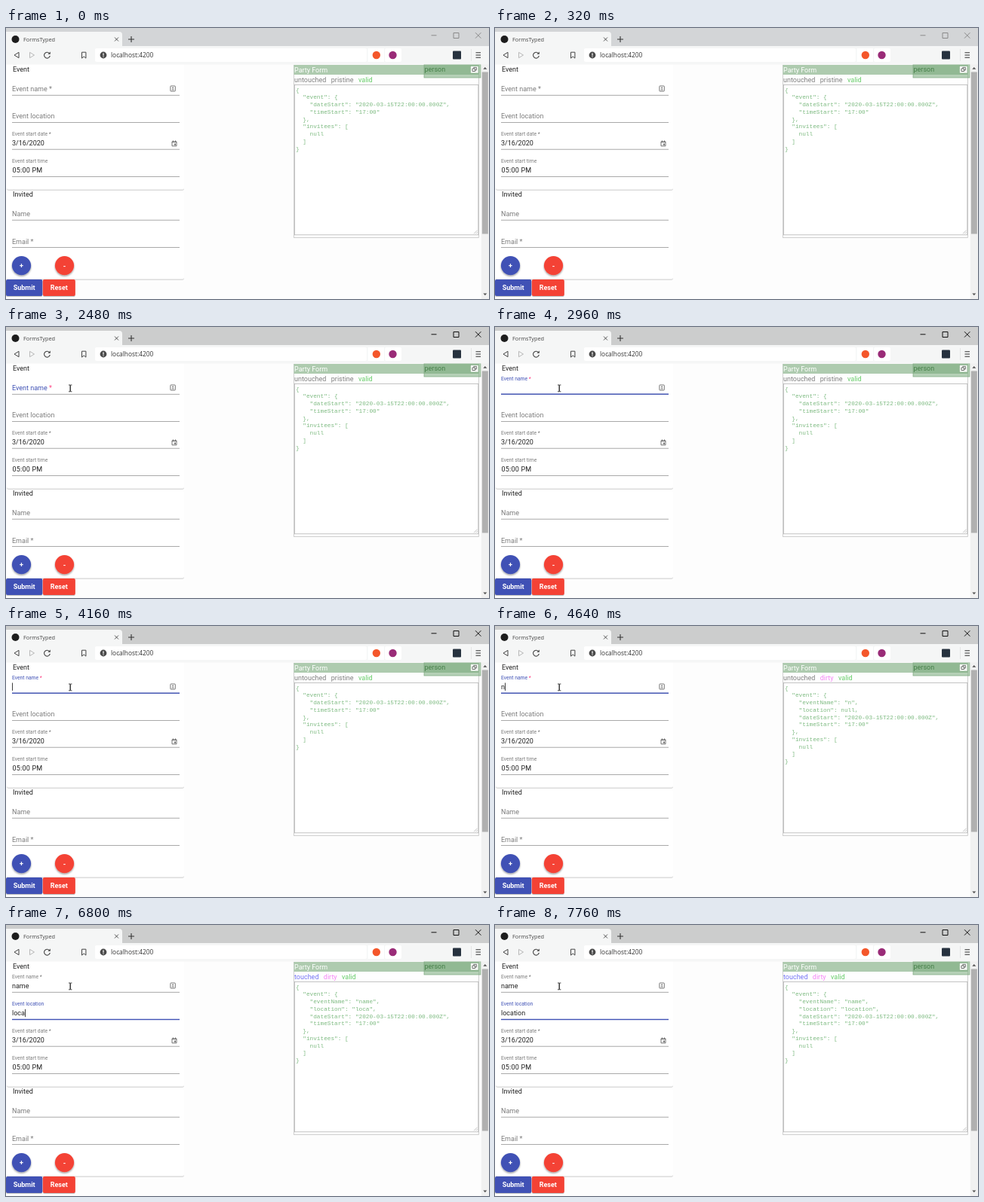
These frames come from a looping animation (640x360 px, 8 s). An HTML page:

```html
<!DOCTYPE html>
<html lang="en">
<head>
<meta charset="utf-8">
<title>FormsTyped</title>
<style>
html, body { margin: 0; width: 100%; height: 100%; overflow: hidden; background: #fff; }
svg { display: block; width: 640px; height: 360px; }
text { font: 9px Roboto, sans-serif; white-space: pre; }
.ui { font-family: "Open Sans", "Noto Sans", sans-serif; }
.small { font-size: 6.75px; }
.btn { font-weight: 700; fill: #fff; text-anchor: middle; }
.code { font: 7.74px "Liberation Mono", "DejaVu Sans Mono", monospace; fill: #7dba80; }
.line { fill: none; stroke-linecap: butt; }
</style>
</head>
<body>
<svg id="stage" viewBox="0 0 640 360" xmlns="http://www.w3.org/2000/svg">
  <defs>
    <filter id="shadow" x="-30%" y="-30%" width="160%" height="170%">
      <feDropShadow dx="0" dy="1.4" stdDeviation="1.3" flood-opacity=".42"/>
    </filter>
    <filter id="soft" x="-5%" y="-5%" width="110%" height="112%">
      <feDropShadow dx="0" dy=".8" stdDeviation=".7" flood-opacity=".32"/>
    </filter>
  </defs>
  <g id="page"></g>
  <g id="chrome"></g>
  <g id="pointer"></g>
</svg>
<script>
const LOOP = 8000, STEP = 80;
const INDIGO = '#3f51b5', RED = '#f44336', GREY = '#7b7b7b', INK = '#222';
const $ = id => document.getElementById(id);

const rect = (x, y, w, h, fill, more = '') =>
  `<rect x="${x}" y="${y}" width="${w}" height="${h}" fill="${fill}" ${more}/>`;
const path = (d, stroke, width = 1, more = '') =>
  `<path class="line" d="${d}" stroke="${stroke}" stroke-width="${width}" ${more}/>`;
const disc = (x, y, r, fill, more = '') =>
  `<circle cx="${x}" cy="${y}" r="${r}" fill="${fill}" ${more}/>`;
const text = (x, y, str, fill = INK, more = '') =>
  `<text x="${x}" y="${y}" fill="${fill}" ${more}>${str}</text>`;

function browser() {
  return rect(0, 0, 640, 25, '#d3d5d7', 'id="strip"') +
    `<path d="M0 25V5h150q4 0 4 4v16z" fill="#f5f6f6"/>` +
    rect(0, 24, 640, 24.5, '#f5f6f6') +
    rect(118, 27, 360, 18, '#fff', 'rx="2"') +
    rect(479.5, 27, 21.5, 18, '#fff') +
    rect(502, 27, 22, 18, '#fff', 'rx="2"') +
    // tab
    disc(12.5, 15, 5, '#1d1d1d') +
    text(23, 17.8, 'FormsTyped', '#444', 'class="ui" style="font-size:7.3px"') +
    path('M144 12.5l5 5m0-5l-5 5', '#444', .9) +
    path('M162 15h8m-4-4v8', '#333', 1.1) +
    // window buttons
    `<g id="winButtons" stroke="#8a8a8a">` +
    `<path class="line" d="M563.5 9.8h7M593 6.5h7v7h-7zM622 6.2l7.4 7.4m0-7.4l-7.4 7.4"/></g>` +
    // navigation
    path('M17 32.3v7.4l-6-3.7z', '#444', 1, 'stroke-linejoin="round"') +
    path('M31.5 32.3v7.4l6-3.7z', '#b9b9b9', 1, 'stroke-linejoin="round"') +
    path('M57.4 33.6a3.9 3.9 0 1 0 .9 3.3', '#444', 1.1) +
    '<path d="M55.4 34.8h3.4v-3.4z" fill="#444"/>' +
    path('M100.5 32.2h5.4v7.9l-2.7-2.2-2.7 2.2z', '#444', 1) +
    disc(129, 36, 4.4, '#4a4a4a') +
    rect(128.4, 33.4, 1.2, 3.3, '#fff') + rect(128.4, 37.5, 1.2, 1.2, '#fff') +
    text(139, 39.1, 'localhost:4200', '#333', 'class="ui" style="font-size:8.35px"') +
    disc(490.8, 36, 5.2, '#f4572b') +
    disc(512.5, 36, 5.2, '#9a2c78') +
    rect(592, 30.5, 11, 11, '#27323f', 'rx="1"') +
    path('M616.5 28v16', '#ddd', .7) +
    path('M622.5 32.7h6.5m-6.5 3.3h6.5m-6.5 3.3h6.5', '#333', 1.1);
}

const card = (y, h) => rect(1, y, 235, h, '#fff', 'rx="2" filter="url(#soft)"');
const underline = y => rect(8, y, 222, .75, '#8c8c8c');

function roundButton(x, sign, fill) {
  return disc(x, 315.6, 12.6, fill, 'filter="url(#shadow)"') +
    text(x, 318.7, sign, '#fff', 'class="btn"');
}
function flatButton(x, w, label, fill) {
  return rect(x, 334, w, 22, fill, 'rx="2" filter="url(#soft)"') +
    text(x + w / 2, 348.2, label, '#fff', 'class="btn"');
}

// A text field whose label floats on focus.
function field(id, y, label, star = '') {
  return underline(y + 5.2) +
    rect(8, y + 4.8, 222, 1.4, INDIGO, `id="${id}Bar"`) +
    `<g id="${id}Label"><text id="${id}Name">${label}<tspan id="${id}Star">${star}</tspan></text></g>` +
    text(8, y, '', INK, `id="${id}Value"`) +
    rect(8, y - 8.2, .8, 10.4, '#111', `id="${id}Caret"`);
}

function form() {
  return card(40, 174.5) + card(217, 116.5) +
    text(9, 58, 'Event') + text(9, 224.3, 'Invited') +
    field('name', 83.7, 'Event name', ' *') +
    field('place', 120, 'Event location') +
    `<g id="cardIcon">` +
    '<rect x="217.9" y="77" width="6.4" height="7" rx=".6" class="line" stroke="currentColor"/>' +
    '<circle cx="221.1" cy="79.4" r="1" fill="currentColor"/>' +
    '<path d="M219.2 82.4q1.9-2.4 3.8 0z" fill="currentColor"/></g>' +
    text(8, 143, 'Event start date *', GREY, 'class="small"') +
    text(8, 156.3, '3/16/2020') + underline(160.8) +
    path('M220 151h6v5.8h-6zM220 151.6h6M221.4 149.4v1.6m3.2-1.6v1.6', '#666', .9) +
    rect(223, 153.6, 2, 2, '#666') +
    text(8, 179, 'Event start time', GREY, 'class="small"') +
    text(8.5, 192.2, '05:00 PM', INK, 'letter-spacing=".22"') + underline(197) +
    text(8, 250.2, 'Name', GREY) + underline(254.8) +
    text(8, 286.6, 'Email *', GREY) + underline(291) +
    roundButton(20.5, '+', INDIGO) + roundButton(77.5, '-', RED) +
    flatButton(0, 48.3, 'Submit', INDIGO) + flatButton(48.8, 43, 'Reset', RED);
}

function panel() {
  let out = rect(381.5, 49.5, 245, 229, '#fefefe', 'stroke="#c4c4c4" stroke-width=".8"') +
    rect(381.5, 49, 245, 13, '#aecbaf') +
    text(382, 59, 'Party Form', '#fff') +
    rect(554, 48.5, 75, 17.5, '#7aab7c', 'fill-opacity=".55" stroke="#7da57f" stroke-width=".7"') +
    text(554.5, 58.4, 'person', '#47804a') +
    rect(615.5, 50.5, 10.5, 9.5, '#f4f8f4', 'stroke="#7da57f" stroke-width=".5"') +
    path('M618 54h3.5v3.5h-3.5zM619.8 54v-1.6h3.6v3.6h-1.8', '#555', .8) +
    '<text id="status" x="382" y="71.8"></text>' +
    rect(382.4, 75.4, 243.4, 199.4, '#fff', 'stroke="#b5b5b5" stroke-width=".8"') +
    path('M620 273.3l4.5-4.5m-2 4.5l2-2', '#999', .6);
  for (let i = 0; i < 11; i++)
    out += text(384, (84.6 + i * 9.75).toFixed(2), '', '', `class="code" id="code${i}"`);
  return out;
}

function scrollbar() {
  return rect(629.8, 48, 10.2, 312, '#f1f1f1') +
    rect(630.8, 58.5, 8, 215, '#b0b0b0') +
    '<path d="M632.3 54.8h5l-2.5-2.8zM632.3 352.4h5l-2.5 2.8z" fill="#555"/>';
}

$('page').innerHTML = rect(0, 48, 640, 312, '#fdfdfd') + form() + panel() + scrollbar();
$('chrome').innerHTML = browser();
$('pointer').innerHTML =
  path('M83 77h1.6q.6 0 .6.6v7.6q0 .6-.6.6h-1.6M87.4 77h-1.6q-.6 0-.6.6v7.6q0 .6.6.6h1.6', '#111', .8, 'id="beam"') +
  '<path id="arrow" d="M0 0v9.6l2.2-2 1.4 3.3 1.4-.6-1.4-3.2h3z" fill="#fff" stroke="#111" stroke-width=".7"/>';

const between = (t, a, b) => t >= a && t < b;
const ease = p => p * p * (3 - 2 * p);
const rise = (t, start, length) => ease(Math.min(1, Math.max(0, (t - start) / length)));
const show = (id, on) => $(id).setAttribute('visibility', on ? 'visible' : 'hidden');

// Times at which each next letter appears.
const TYPING = {
  name: [4640, 4720, 4800, 4880],
  location: [6640, 6720, 6760, 6800, 6880, 6960, 7040, 7120]
};
const typed = (word, t) => word.slice(0, TYPING[word].filter(at => t >= at).length);

function drawField(id, y, value, p, focused, caret) {
  $(id + 'Label').setAttribute('transform', `translate(8 ${y - 13.2 * p}) scale(${1 - .25 * p})`);
  $(id + 'Name').setAttribute('fill', focused ? INDIGO : GREY);
  $(id + 'Star').setAttribute('fill', focused ? '#ff4081' : GREY);
  const bar = $(id + 'Bar'), w = focused ? 222 * p : 0;
  bar.setAttribute('x', 119 - w / 2);
  bar.setAttribute('width', w);
  $(id + 'Value').textContent = value;
  $(id + 'Caret').setAttribute('x', 8.2 + (value ? $(id + 'Value').getComputedTextLength() : 0));
  show(id + 'Caret', caret);
}

function json(name, place) {
  const event = [
    ...(name ? [`"eventName": "${name}",`, `"location": ${place ? `"${place}"` : 'null'},`] : []),
    '"dateStart": "2020-03-15T22:00:00.000Z",',
    '"timeStart": "17:00"'
  ];
  return ['{', '  "event": {', ...event.map(s => '    ' + s), '  },',
    '  "invitees": [', '    null', '  ]', '}'];
}

function draw(t) {
  const active = t >= 2480, second = t >= 6400;
  const name = typed('name', t), place = typed('location', t);

  $('strip').setAttribute('fill', active ? '#cccdcd' : '#d3d5d7');
  $('winButtons').setAttribute('stroke', active ? '#111' : '#8a8a8a');
  $('cardIcon').style.color = between(t, 2160, 2480) ? '#111' : '#777';

  drawField('name', 83.7, name, rise(t, 2480, 400), active && !second,
    between(t, 3280, 3760) || between(t, 4160, 6400));
  drawField('place', 120, place, rise(t, 6400, 240), second, between(t, 6400, 7760));

  const words = [
    second ? ['touched', '#7474f5'] : ['untouched', '#808080'],
    name ? ['dirty', '#f584f5'] : ['pristine', '#808080'],
    ['valid', '#66cc68']
  ];
  $('status').innerHTML = words.map(([w, c], i) =>
    `<tspan fill="${c}" ${i ? 'dx="6.4"' : ''}>${w}</tspan>`).join('');
  const lines = json(name, place);
  for (let i = 0; i < 11; i++) $('code' + i).textContent = lines[i] || '';

  show('arrow', between(t, 2240, 2320));
  $('arrow').setAttribute('transform', 'translate(78 332)');
  show('beam', t >= 2320);
}

let last = -1;
function tick() {
  const t = Math.floor(performance.now() % LOOP / STEP) * STEP;
  if (t !== last) draw(last = t);
  requestAnimationFrame(tick);
}
tick();
</script>
</body>
</html>
```
